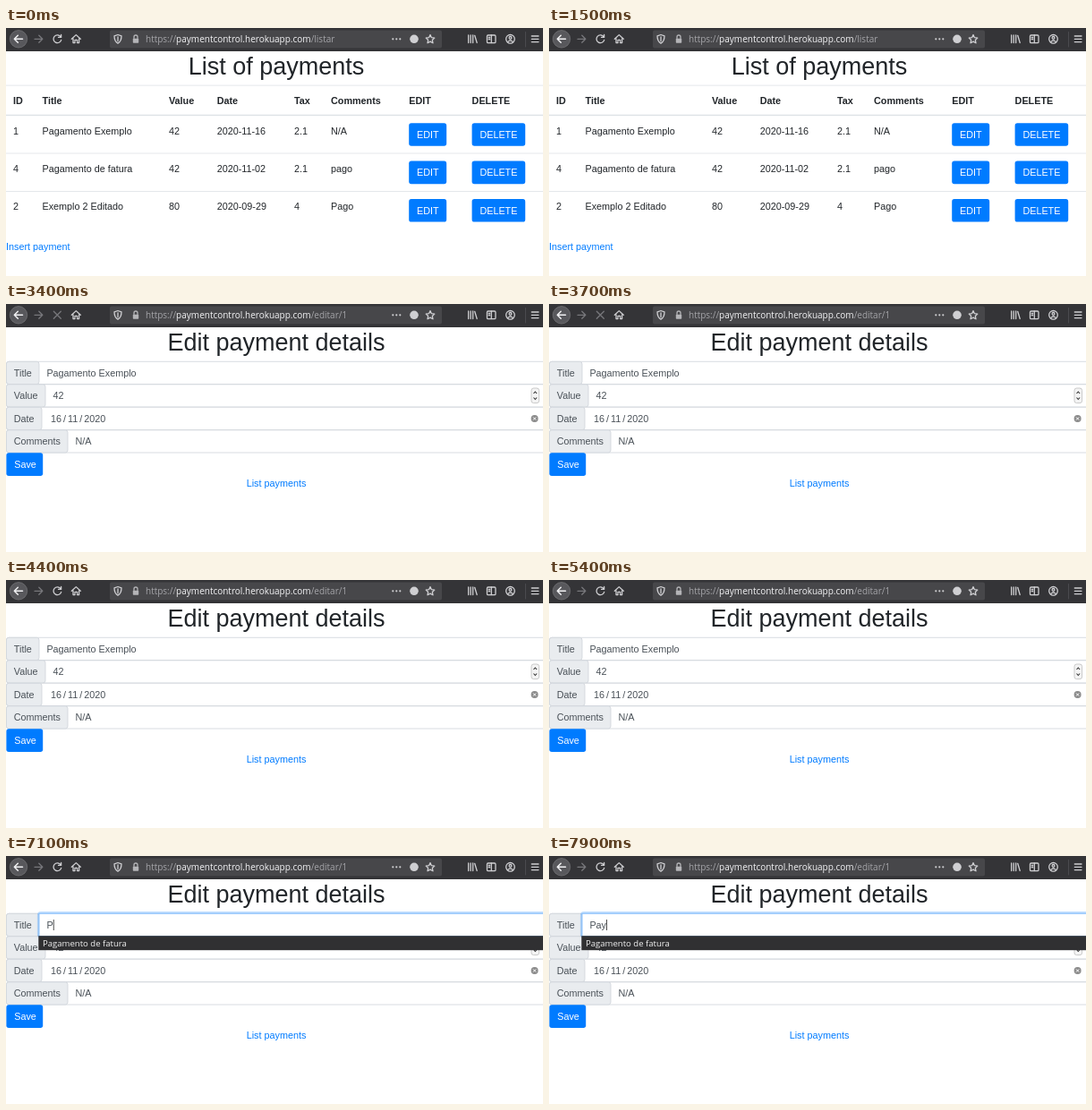
An HTML page for the animation above (8000 ms loop, 600 by 277 pixels).

```html
<!DOCTYPE html>
<html lang="en">
<head>
<meta charset="utf-8">
<title>Payments</title>
<style>
html, body { margin: 0; width: 100%; height: 100%; overflow: hidden; background: #fff; }
svg { display: block; width: 100vw; height: 100vh; }
text { font: 10.8px "Liberation Sans", Arial, sans-serif; fill: #212529; white-space: pre; }
.h1 { font-size: 27px; text-anchor: middle; }
.b { font-weight: bold; }
.w { fill: #fff; }
.link { fill: #007bff; }
.mid { text-anchor: middle; }
.field { fill: #495057; }
.ui { font: 10px "Open Sans", "Noto Sans", sans-serif; fill: #a4a4a8; }
.host { fill: #f4f4f6; }
.icon { fill: none; stroke: #cfcfd2; stroke-width: 1.3; stroke-linecap: round; stroke-linejoin: round; }
</style>
</head>
<body>
<svg viewBox="0 0 600 277">
  <rect width="600" height="277" fill="#fff"/>
  <g id="list"></g>
  <g id="edit"></g>
  <g id="bar">
    <rect width="600" height="26" fill="#343437"/>
    <rect x="116" y="2.5" width="371" height="20" rx="2" fill="#47474a"/>
    <circle cx="14" cy="12.3" r="9.7" fill="#58585c" stroke="#77777a" stroke-width=".7"/>
    <g class="icon">
      <path d="M18.5 12.3H9.5M13.3 8.3L9.3 12.3L13.3 16.3" stroke="#f0f0f2" stroke-width="1.5"/>
      <path d="M32 12.3H40.5M36.8 8.3L40.8 12.3L36.8 16.3" stroke="#77777b"/>
      <path id="reload" d="M61 9.6A4.4 4.4 0 1 0 61.7 13.4M61.6 7.4V10.4H58.5"/>
      <path id="stop" d="M53.3 8.3L61.3 16.3M61.3 8.3L53.3 16.3" stroke="#77777b"/>
      <path d="M73.3 12.3L78.3 7.6L83.3 12.3M75 11.5V16.6H77V13.4H79.6V16.6H81.6V11.5"/>
      <path d="M125 7.5L129 8.8C129 13 128 15.6 125 17.2C122 15.6 121 13 121 8.8ZM125 9.8V14.8"/>
      <path d="M143 11.5V10A2 2 0 0 1 147 10V11.5" stroke="#b4b4b7"/>
      <rect x="141.8" y="11.7" width="6.4" height="5" rx=".8" fill="#b4b4b7" stroke="none"/>
      <path d="M474 7.6L475.4 10.7L478.8 11.1L476.3 13.4L477 16.8L474 15.1L471 16.8L471.7 13.4L469.2 11.1L472.6 10.7Z"/>
      <path d="M516.7 8V16.5M519.2 8V16.5M521.7 8V16.5M523.7 8.3L526.2 16.5"/>
      <rect x="537.5" y="8" width="9.5" height="8.6" rx="1.2"/>
      <path d="M542.3 8V16.6M539.2 10.5H540.6M539.2 12.5H540.6"/>
      <circle cx="563.5" cy="12.3" r="4.8"/>
      <circle cx="563.5" cy="10.9" r="1.4"/>
      <path d="M560.6 15.6Q563.5 12.4 566.4 15.6"/>
      <path d="M580.5 4.5V21" stroke="#555559" stroke-width=".7"/>
      <path d="M587.3 9H595M587.3 12.3H595M587.3 15.6H595"/>
    </g>
    <path d="M432.3 12.3h.01M436.3 12.3h.01M440.3 12.3h.01" stroke="#cfcfd2" stroke-width="2.2" stroke-linecap="round"/>
    <circle cx="456" cy="12.3" r="4.8" fill="#cfcfd2"/>
    <text class="ui" x="156" y="16">https://<tspan class="host">paymentcontrol.herokuapp.com</tspan><tspan id="path"></tspan></text>
  </g>
</svg>
<script>
const $ = id => document.getElementById(id);
const text = (x, y, s, cls = '', more = '') => `<text x="${x}" y="${y}" class="${cls}" ${more}>${s}</text>`;
const rect = (x, y, w, h, fill, more = '') => `<rect x="${x}" y="${y}" width="${w}" height="${h}" fill="${fill}" ${more}/>`;
const button = (x, y, w, s, id = '') =>
  rect(x, y, w, 25.6, '#007bff', `rx="2.7" id="${id}"`) + text(x + 8.8, y + 16.8, s, 'w');

const cols = [8, 40.5, 182, 235.7, 322, 363, 450.2, 520.6];
const rows = [
  ['1', 'Pagamento Exemplo', '42', '2020-11-16', '2.1', 'N/A'],
  ['4', 'Pagamento de fatura', '42', '2020-11-02', '2.1', 'pago'],
  ['2', 'Exemplo 2 Editado', '80', '2020-09-29', '4', 'Pago']
];
const heads = ['ID', 'Title', 'Value', 'Date', 'Tax', 'Comments', 'EDIT', 'DELETE'];

$('list').innerHTML =
  text(302, 52, 'List of payments', 'h1') +
  rect(0, 63.7, 600, .8, '#dee2e6') + rect(0, 96.7, 600, 1.4, '#dee2e6') +
  heads.map((s, i) => text(cols[i], 84.7, s, 'b')).join('') +
  rows.map((row, r) => {
    const y = 106.2 + r * 42.4;
    return (r ? rect(0, y - 9, 600, .8, '#dee2e6') : '') +
      row.map((s, i) => text(cols[i], y + 12.4, s)).join('') +
      button(cols[6], y, 42, 'EDIT', 'edit' + r) + button(cols[7], y, 59.6, 'DELETE');
  }).join('') +
  text(0, 247.7, 'Insert payment', 'link');

const border = 'stroke="#ced4da" stroke-width=".8" rx="2.7"';
const fields = [
  ['Title', 37, ''],
  ['Value', 44, '42'],
  ['Date', 40, '16 / 11 / 2020'],
  ['Comments', 69, 'N/A']
];
const spinner = rect(587, 94, 8.6, 16.6, '#f4f4f4', 'rx="2.5" stroke="#b5b5b5" stroke-width=".7"') +
  '<path d="M589.5 100L591.3 98L593.1 100M589.5 104.5L591.3 106.5L593.1 104.5" fill="none" stroke="#333" stroke-width="1.1"/>';
const clear = '<circle cx="590.6" cy="128" r="4" fill="#8b8b8b"/>' +
  '<path d="M589 126.4L592.2 129.6M592.2 126.4L589 129.6" stroke="#fff" stroke-width="1"/>';

$('edit').innerHTML =
  text(302, 52, 'Edit payment details', 'h1') +
  fields.map(([label, x, value], i) => {
    const y = 64.3 + i * 25.5;
    return rect(.4, y, 603, 25.2, '#fff', border) + rect(.4, y, x - .4, 25.2, '#e9ecef', border) +
      text(8.8, y + 16.4, label, 'field') +
      text(x + (i == 2 ? 10 : 8.4), y + 16.4, value, 'field', i == 2 ? 'style="word-spacing:-1px"' : '');
  }).join('') +
  spinner + clear +
  button(.4, 166.3, 40.8, 'Save') +
  text(302, 203.8, 'List payments', 'link mid') +
  '<g id="focus">' +
    rect(36, 63.2, 569, 27.4, 'none', 'rx="3" stroke="#007bff" stroke-opacity=".25" stroke-width="2.2"') +
    rect(37, 64.3, 567, 25.2, '#fff', 'stroke="#80bdff" stroke-width=".9"') +
  '</g>' +
  rect(45.2, 70.3, 100.3, 12.8, '#3584d6', 'id="selection"') +
  text(45.4, 80.7, '', 'field', 'id="title"') +
  rect(64, 71, .8, 12, '#222', 'id="caret"') +
  '<g id="menu">' + rect(36.3, 89.2, 564, 16, '#303032') +
    text(41, 101, 'Pagamento de fatura', 'ui', 'style="font-size:9.55px;fill:#f2f2f2"') + '</g>';

const show = (id, on) => $(id).style.display = on ? '' : 'none';
const ease = (t, start) => {
  const p = Math.min(1, Math.max(0, (t - start) / 150));
  return p * p * (3 - 2 * p);
};
const typed = [[7900, 'Pay', 64.2], [7300, 'Pa', 58.8], [7100, 'P', 52.8]];

function draw(t) {
  const editing = t >= 3300, loading = t >= 3000 && t < 3900;
  show('list', !editing);
  show('edit', editing);
  show('stop', loading);
  show('reload', !loading);
  $('path').textContent = editing ? '/editar/1' : '/listar';

  const hover = ease(t, 1800);
  $('edit0').setAttribute('fill', `rgb(0,${123 - 18 * hover},${255 - 38 * hover})`);

  const entry = typed.find(e => t >= e[0]);
  const selected = t >= 5600 && !entry;
  $('focus').style.opacity = ease(t, 5500);
  show('selection', selected);
  show('caret', entry);
  show('menu', entry);
  $('title').textContent = entry ? entry[1] : 'Pagamento Exemplo';
  $('title').style.fill = selected ? '#fff' : '';
  if (entry) $('caret').setAttribute('x', entry[2]);
}

const start = performance.now();
function frame() {
  draw((performance.now() - start) % 8000);
  requestAnimationFrame(frame);
}
frame();
</script>
</body>
</html>
```
